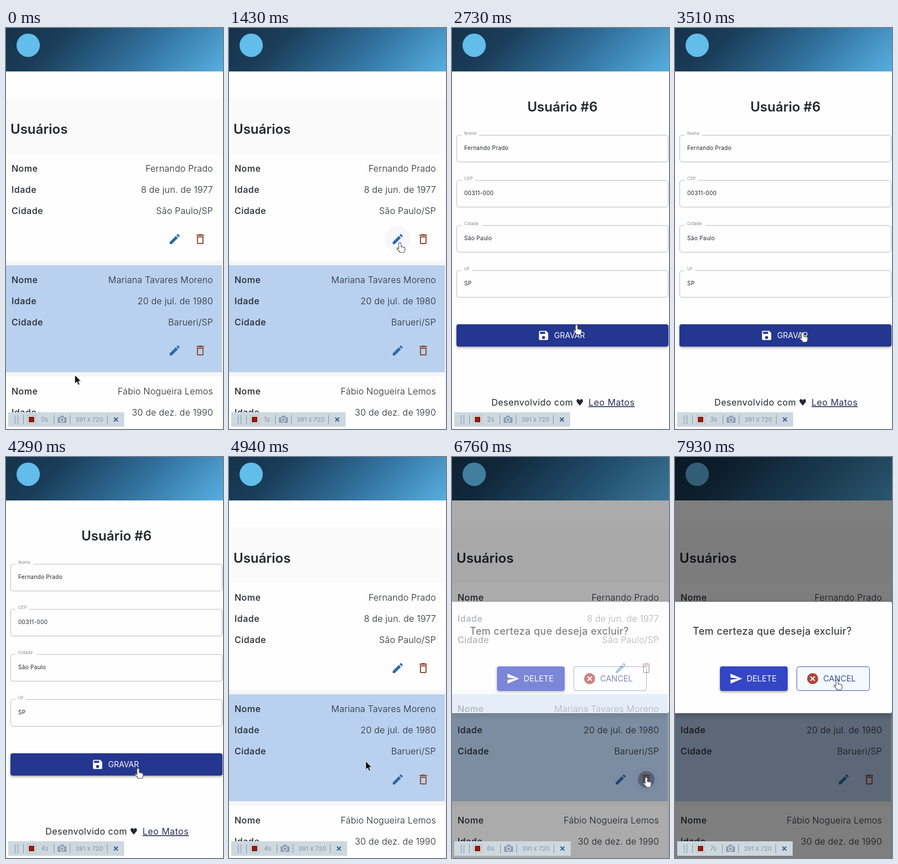
Animation, 391 px wide and 720 px high, one loop 8000 ms. Source, as an HTML page:

```html
<!DOCTYPE html>
<html lang="pt-BR">
<head>
<meta charset="utf-8">
<title>Usuários</title>
<style>
  html, body { margin: 0; width: 100%; height: 100%; overflow: hidden; background: #fefefe; }
  .head { position: absolute; left: 0; top: 0; width: 391px; height: 78px;
    background: linear-gradient(135deg, #16324b 0%, #1a3d59 24%, #32729f 62%, #57afe0 100%); }
  svg { position: absolute; left: 0; top: 0; display: block; }
  text { font-family: Inter, sans-serif; font-size: 16px; fill: #23262f; letter-spacing: .03em; white-space: pre; }
  .h { font-size: 24px; font-weight: 600; letter-spacing: 0; }
  .key { font-weight: 450; }
  .val { font-weight: 300; text-anchor: end; letter-spacing: .012em; }
  .small { font-size: 10px; }
  .label { font-size: 7.5px; fill: #85858f; }
  .btn { font-size: 14.5px; letter-spacing: 0; }
  .bar text { font-size: 11.5px; fill: #8794a5; letter-spacing: 0; }
  .raised { filter: drop-shadow(0 2px 2px rgba(0,0,0,.35)); }
  .modal { filter: drop-shadow(0 3px 5px rgba(0,0,0,.3)); }
</style>
</head>
<body>
<div class="head"></div>
<svg width="391" height="720" viewBox="0 0 391 720">
  <defs>
    <path id="pen" d="M3 17.25V21h3.75L17.81 9.94l-3.75-3.75zM20.71 7.04a1 1 0 0 0 0-1.41l-2.34-2.34a1 1 0 0 0-1.41 0l-1.83 1.83 3.75 3.75z"/>
    <path id="bin" fill-rule="evenodd" d="M6 19a2 2 0 0 0 2 2h8a2 2 0 0 0 2-2V7H6zM8 9h8v10H8zM15.5 4l-1-1h-5l-1 1H5v2h14V4z"/>
    <path id="disk" fill-rule="evenodd" d="M17 3H5a2 2 0 0 0-2 2v14a2 2 0 0 0 2 2h14a2 2 0 0 0 2-2V7zM12 19a3 3 0 1 1 0-6 3 3 0 0 1 0 6zM15 9H5V5h10z"/>
    <path id="send" d="M2 21l21-9L2 3v7l15 2-15 2z"/>
  </defs>
  <circle cx="40" cy="31" r="21" fill="#62bdea"/>

  <g id="list">
    <rect y="126" width="391" height="594" fill="#fafafa"/>
    <text class="h" x="8" y="190">Usuários</text>
    <rect y="418" width="391" height="302" fill="#f6f6f7"/>
    <g id="cards"></g>
    <circle id="hover" r="23" fill="#3040d0" opacity=".04"/>
    <circle id="ripple" cx="350" cy="579" r="15" fill="#1c2c48" opacity=".35"/>
    <g id="icons"></g>
  </g>

  <g id="form">
    <text class="h" x="199" y="150" text-anchor="middle">Usuário #6</text>
    <g id="fields"></g>
    <rect class="raised" x="8" y="532" width="382" height="40" rx="4" fill="#24368f"/>
    <use href="#disk" transform="translate(154 541) scale(.92)" fill="#fff"/>
    <text x="184" y="557" style="font-size:14px;letter-spacing:0;fill:#fff">GRAVAR</text>
    <text x="71" y="678">Desenvolvido com</text>
    <text x="223" y="678" style="font-family:'DejaVu Sans',sans-serif">♥</text>
    <text x="246" y="678" text-decoration="underline" style="fill:#2a2f55">Leo Matos</text>
  </g>

  <g id="dialog">
    <rect width="391" height="720" opacity=".5"/>
    <path class="modal" d="M0 260H387a4 4 0 0 1 4 4V456a4 4 0 0 1-4 4H0z" fill="#fefefe"/>
    <text x="32" y="319" style="font-size:18px;letter-spacing:.023em">Tem certeza que deseja excluir?</text>
    <rect class="raised" x="81" y="376" width="122" height="44" rx="4" fill="#3446c4"/>
    <use href="#send" transform="translate(98 386)" fill="#fff"/>
    <text class="btn" x="129" y="403" style="fill:#fff">DELETE</text>
    <rect id="cancel" x="219.5" y="376.5" width="131" height="43" rx="4" stroke="#4a5f9e"/>
    <circle cx="248" cy="398" r="10" fill="#ae453b"/>
    <path d="M244.2 394.2l7.6 7.6m0-7.6l-7.6 7.6" stroke="#fff" stroke-width="2"/>
    <text class="btn" x="267" y="403" style="fill:#3c5294">CANCEL</text>
  </g>

  <g class="bar">
    <rect id="strip" x="4" y="690" height="26" fill="#cdd8df"/>
    <path d="M16.5 696v15M21.5 696v15" stroke="#7f93a8" stroke-width="2" stroke-dasharray="1.6 1.7"/>
    <path d="M31.5 695v16" stroke="#8494a4"/>
    <rect x="38.5" y="695.5" width="15" height="15" fill="#dfe5e8" stroke="#a9b5be"/>
    <rect x="41" y="698" width="10" height="10" fill="#8b1f10"/>
    <text id="secs" x="63" y="707">0s</text>
    <g id="tail">
      <path d="M86.5 695v16M115.5 695v16M182.5 695v16" stroke="#8494a4"/>
      <path d="M93 699h4l1.5-3h5l1.5 3h4v10H93z" fill="#8c9eb0"/>
      <circle cx="101" cy="703.5" r="3.4" fill="none" stroke="#dbe4ea" stroke-width="1.5"/>
      <text x="125" y="707" style="font-size:11px">391 x 720</text>
      <path d="M194.5 699.5l7 7m0-7l-7 7" stroke="#3c6590" stroke-width="2"/>
    </g>
  </g>

  <g id="cursor" stroke-linejoin="round">
    <path id="arrow" d="M0 0V15.5L3.6 12.2 6.3 18 8.8 16.9 6.2 11.3H11z" fill="#0b0b0b" stroke="#fff" stroke-width=".8"/>
    <path id="hand" d="M-2 2a2 2 0 0 1 4 0V8q1.5-1 2.5.3 1.5-.8 2.5.6 2-.5 2 1.5V13q0 2-1.5 5H0q-1-3-5-6-1.5-2 .5-2.3l2.5 1.5z" fill="#fff" stroke="#4d515c" stroke-width="1.1"/>
  </g>
</svg>
<script>
const $ = id => document.getElementById(id);
const show = (id, on) => $(id).setAttribute('visibility', on ? 'visible' : 'hidden');

const people = [
  ['Fernando Prado', '8 de jun. de 1977', 'São Paulo/SP'],
  ['Mariana Tavares Moreno', '20 de jul. de 1980', 'Barueri/SP'],
  ['Fábio Nogueira Lemos', '30 de dez. de 1990', 'São Paulo/SP']
];
const keys = ['Nome', 'Idade', 'Cidade'];

$('cards').innerHTML = people.map((p, i) => {
  const y = 226 + 200 * i;
  return `<rect y="${y}" width="389" height="192" fill="${i === 1 ? '#b9d1ef' : '#fefefe'}"/>` +
    keys.map((k, j) => {
      const base = y + 32 + 38 * j;
      return `<text class="key" x="10" y="${base}">${k}</text><text class="val" x="373" y="${base}">${p[j]}</text>`;
    }).join('');
}).join('');

$('icons').innerHTML = [367, 567].map(y =>
  `<use href="#pen" x="292" y="${y}" fill="#2f6aa8"/><use href="#bin" x="338" y="${y}" fill="#8d4e3a"/>`).join('');

// each field: label, value, end of the notch in the outline
$('fields').innerHTML = [
  ['Nome', people[0][0], 49], ['CEP', '00311-000', 41], ['Cidade', 'São Paulo', 55], ['UF', 'SP', 36]
].map(([label, value, end], i) => {
  const y = 192.5 + 81 * i;
  return `<path d="M${end} ${y}H385.5a4 4 0 0 1 4 4v40a4 4 0 0 1-4 4H12.5a4 4 0 0 1-4-4v-40a4 4 0 0 1 4-4H17" fill="none" stroke="#bdbdc1"/>
    <text class="label" x="22" y="${y - .5}">${label}</text>
    <text class="small" x="22" y="${y + 26.5}">${value}</text>`;
}).join('');

// cursor: time, x, y
const path = [
  [0, 124, 623], [260, 124, 623], [1170, 308, 385], [1950, 308, 385],
  [2600, 224, 532], [3510, 230, 546], [4160, 238, 559], [4810, 238, 559],
  [5590, 350, 383], [5720, 350, 383], [5980, 347, 490], [6370, 350, 575],
  [6890, 350, 575], [7670, 292, 400], [8000, 292, 400]
];
const LOOP = 8000, STEP = 130;
const FORM_IN = 1820, FORM_OUT = 4680, CLICK = 6500, FADE_AT = 6614, FADE = 225;
const tailShift = { 1: -3, 6: 1, 7: -1 };

function cursorAt(t) {
  const i = path.findIndex(k => k[0] > t);
  const [t0, x0, y0] = path[i - 1], [t1, x1, y1] = path[i];
  const p = (t - t0) / (t1 - t0), e = p * p * (3 - 2 * p);
  return [x0 + (x1 - x0) * e, y0 + (y1 - y0) * e];
}

function draw(t) {
  const [x, y] = cursorAt(t);
  const within = (l, tp, r, b) => x >= l && x <= r && y >= tp && y <= b;
  const form = t >= FORM_IN && t < FORM_OUT;
  const fade = Math.min(1, Math.max(0, (t - FADE_AT) / FADE));
  const modal = fade === 1;

  const near = (cx, cy) => !form && !modal && Math.hypot(x - cx, y - cy) < 23;
  const spot = [[304, 379], [350, 379], [304, 579], [350, 579]].find(c => near(...c));
  const onCancel = modal && within(219, 376, 351, 420);
  const onButton = form && within(8, 531, 390, 572);
  const hand = spot || onCancel || onButton || (modal && within(81, 376, 203, 420));

  show('list', !form);
  show('form', form);
  // children must not override a hidden list
  $('hover').setAttribute('display', spot ? 'inline' : 'none');
  if (spot) {
    $('hover').setAttribute('cx', spot[0]);
    $('hover').setAttribute('cy', spot[1]);
  }
  $('ripple').setAttribute('display', t >= CLICK && !modal ? 'inline' : 'none');
  $('dialog').setAttribute('opacity', fade);
  $('cancel').setAttribute('fill', onCancel ? '#f4f8ff' : '#fefefe');
  $('cancel').setAttribute('stroke-opacity', onCancel ? 1 : .7);

  const s = Math.floor(t / 1000), dx = tailShift[s] || 0;
  $('secs').textContent = s + 's';
  $('tail').setAttribute('transform', `translate(${dx})`);
  $('strip').setAttribute('width', 209 + dx);

  $('cursor').setAttribute('transform', `translate(${x} ${y})`);
  show('hand', hand);
  show('arrow', !hand);
}

const start = performance.now();
function tick() {
  const t = (performance.now() - start) % LOOP;
  draw(Math.floor(t / STEP) * STEP);
  requestAnimationFrame(tick);
}
tick();
</script>
</body>
</html>
```
